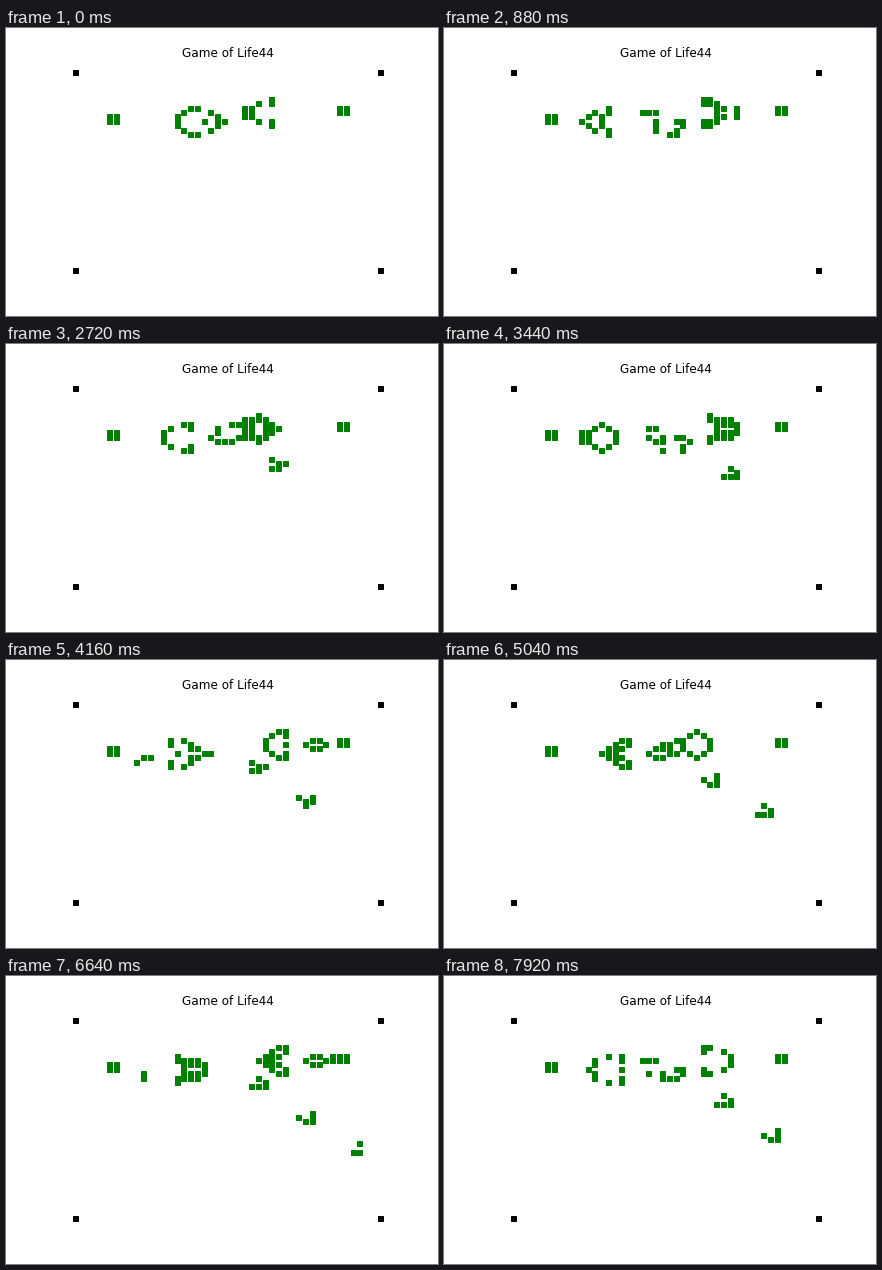
A matplotlib script that plays this animation: 432 px wide and 288 px high, repeating every 8000 ms.

```python
import numpy as np
import matplotlib.pyplot as plt
from matplotlib.animation import FuncAnimation

FRAMES, INTERVAL = 100, 80
LAST = 45           # coordinate of the far corner marks
VISIBLE = 43        # cells at or beyond this column and row are not drawn
BOARD = 64          # simulated board, larger than the visible part

GUN = """
........................O...........
......................O.O...........
............OO......OO............OO
...........O...O....OO............OO
OO........O.....O...OO..............
OO........O...O.OO....O.O...........
..........O.....O.......O...........
...........O...O....................
............OO......................
""".split()


def first_generation(row=6, col=5):
    board = np.zeros((BOARD, BOARD), dtype=int)
    cells = np.array([[c == "O" for c in line] for line in GUN])
    board[row:row + cells.shape[0], col:col + cells.shape[1]] = cells
    return board


def next_generation(board):
    near = sum(np.roll(board, (dy, dx), (0, 1))
               for dy in (-1, 0, 1) for dx in (-1, 0, 1)) - board
    return ((near == 3) | ((near == 2) & (board == 1))).astype(int)


generations = [first_generation()]
while len(generations) < FRAMES:
    generations.append(next_generation(generations[-1]))

fig = plt.figure(figsize=(6, 4), dpi=72, facecolor="white")
ax = fig.add_axes([0.125, 0.125, 0.775, 0.755])
margin = 0.05 * LAST
ax.set_xlim(-margin, LAST + margin)
ax.set_ylim(LAST + margin, -margin)
ax.axis("off")
ax.set_title("Game of Life44", fontsize=12, family="DejaVu Sans", pad=6)

square = dict(marker="s", linestyle="", markersize=5, markeredgewidth=1)
ax.plot([0, 0, LAST, LAST], [0, LAST, 0, LAST], color="black", **square)
cells, = ax.plot([], [], color="green", **square)


def update(frame):
    rows, cols = np.nonzero(generations[frame][:VISIBLE, :VISIBLE])
    cells.set_data(cols, rows)
    return cells,


anim = FuncAnimation(fig, update, frames=FRAMES, interval=INTERVAL,
                     repeat=True, repeat_delay=0)
plt.show()
```
